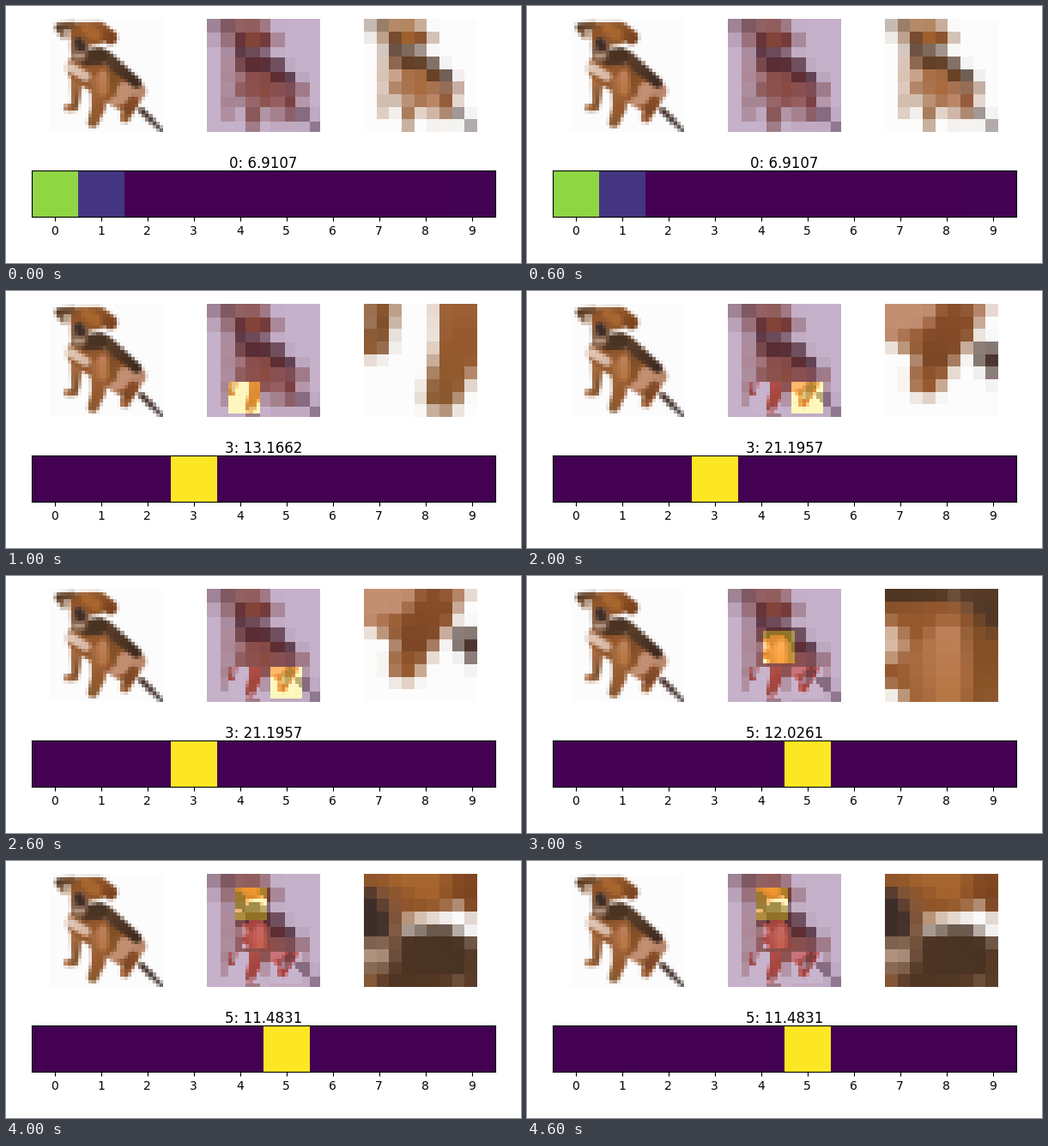
These frames come from a looping animation (600 by 300 pixels, 5 s). A matplotlib script:

```python
import numpy as np
import matplotlib.pyplot as plt
from matplotlib.animation import FuncAnimation
from matplotlib.colors import to_rgb

W, H = 600, 300
N, G = 32, 9              # picture size and glimpse size, in cells
SIDE = 131.9              # picture size on the stage

plt.rcParams["font.family"] = "DejaVu Sans"

# Strokes go on a fine canvas that averages down to 32x32 and 9x9.
S = N * G
gx, gy = np.meshgrid(*[(np.arange(S) + 0.5) / G] * 2)
canvas = np.full((S, S, 3), 0.99)


def stroke(c0, c1, start, end, r0, r1, soft=0.7):
    """Blend in a tapered soft stroke, fading from colour c0 to c1."""
    (x0, y0), (x1, y1) = start, end
    dx, dy = x1 - x0, y1 - y0
    t = np.clip(((gx - x0) * dx + (gy - y0) * dy) / (dx * dx + dy * dy), 0, 1)
    gap = r0 + (r1 - r0) * t - np.hypot(gx - x0 - t * dx, gy - y0 - t * dy)
    cover = np.clip(gap / soft + 0.5, 0, 1)[..., None]
    t = t[..., None]
    tone = np.array(to_rgb(c0)) * (1 - t) + np.array(to_rgb(c1)) * t
    canvas[:] = canvas * (1 - cover) + tone * cover


def draw_dog():
    brown, dark, tan, pink = "#96592e", "#493323", "#a86c42", "#c49074"
    # tail and legs
    stroke("#4a342c", "#5a5052", (26, 26), (31.5, 31.5), 0.9, 0.6)
    stroke(tan, "#80502a", (7.5, 18), (7.3, 23.5), 1.7, 1.1)
    stroke("#80502a", tan, (7, 25), (5.2, 25.2), 1.1, 1.1)
    stroke(brown, brown, (23, 24), (21.3, 28), 2, 1.3)
    # body
    stroke(brown, brown, (9, 14), (21.3, 21.3), 4.2, 4.7)
    stroke(tan, brown, (14, 18), (13.8, 25), 2.4, 1.9)
    stroke(brown, "#8a5a30", (13.5, 26), (12.2, 29.3), 1.8, 1.4)
    stroke("#bd8058", "#b87845", (15, 16), (15, 20), 1.5, 1.5)
    stroke("#7f4e28", "#8a5428", (18, 15), (18.5, 20), 1.5, 1.5)
    stroke(pink, "#b8866a", (21.5, 20.5), (25, 20.5), 2.5, 2.3)
    stroke(pink, pink, (18.5, 23.3), (20.5, 22.5), 1.5, 1.5)
    stroke("#874c28", "#7d4727", (23.5, 23.5), (22, 26), 1.7, 1.4)
    stroke("#5c3f2a", "#402b20", (16, 10.8), (24.5, 18.2), 1.8, 1.5)
    # head
    stroke("#4e3524", dark, (10.5, 11), (14, 10.5), 2.2, 2.4)
    stroke("#925528", "#925528", (9, 4.5), (13.5, 4), 3.5, 3.1)
    stroke("#85583a", "#7a5a44", (8.5, 7.5), (8.3, 10.2), 2.7, 2.3)
    stroke("#8f5428", "#7b431e", (14.5, 2.8), (17.2, 5.3), 1.6, 2)
    stroke("#7a5230", "#5a3a24", (6.5, 2), (2.8, 2.4), 1.2, 1.2)
    stroke("#5a3a24", "#9a7858", (2.6, 2.8), (4, 4.8), 0.9, 0.8)
    stroke("#a8672f", "#a8672f", (10.5, 3), (13, 4.5), 1.5, 1.5)
    stroke("#3d2e2a", "#3d2e2a", (8.2, 6.5), (8.8, 8), 1.2, 1.3)
    # pale muzzle and chest
    stroke("#b0937f", "#b0937f", (7.3, 10.6), (9.2, 10.4), 0.8, 0.8)
    stroke("#e0c6b5", "#d8b8a4", (6, 13.8), (10.2, 16.3), 1.4, 1.4)


def shrink(n):
    b = S // n
    return canvas.reshape(n, b, n, b, 3).mean(axis=(1, 3))


draw_dog()
photo, coarse = shrink(N), shrink(G)
cell = np.arange(N) * G // N
backdrop = coarse[cell][:, cell]
# Sharp cells show warmer and brighter; dark ones keep the coarse tone.
warm = np.clip(photo * [1.4, 1.15, 1.2], 0, 1)
sharp = np.where(photo[..., :1] > 0.55, warm, backdrop)

# (row, column) of each glimpse; the first step sees the coarse picture
spots = [None, (22, 6), (22, 18), (12, 10), (4, 8)]
titles = ["0: 6.9107", "3: 13.1662", "3: 21.1957", "5: 12.0261", "5: 11.4831"]


def window(spot):
    return tuple(slice(a, a + G) for a in spot)


def scores(step):
    p = np.zeros((1, 10))
    if step:
        p[0, int(titles[step][0])] = 1
    else:
        p[0, [0, 1, 9]] = 0.835, 0.16, 0.005
    return p


fig = plt.figure(figsize=(W / 100, H / 100), dpi=100, facecolor="white")


def axes(x, y, w, h):
    return fig.add_axes([x / W, y / H, w / W, h / H])


def show(ax, data, **kw):
    return ax.imshow(data, aspect="auto", interpolation="nearest", **kw)


def picture(x, data):
    ax = axes(x, 153.05, SIDE, SIDE)
    ax.axis("off")
    return ax, show(ax, data)


heat = dict(cmap="viridis", vmin=0, vmax=1)
picture(51.05, photo)
mid_ax, seen = picture(234.05, backdrop)
focus = show(mid_ax, np.zeros((N, N)), alpha=0.3, **heat)
_, glimpse = picture(417.05, coarse)

bar_ax = axes(29.7, 54, 540, 53.9)
bar = show(bar_ax, scores(0), **heat)
bar_ax.set_xticks(range(10))
bar_ax.set_yticks([])
title = fig.text(299.7 / W, 111 / H, titles[0], fontsize=12,
                 ha="center", va="baseline")


def update(step):
    view, mask = backdrop.copy(), np.zeros((N, N))
    for spot in spots[1:step + 1]:
        win = window(spot)
        view[win] = sharp[win]
    if step:
        mask[win] = 1
    glimpse.set_data(photo[win] if step else coarse)
    seen.set_data(view)
    focus.set_data(mask)
    bar.set_data(scores(step))
    title.set_text(titles[step])
    return seen, focus, glimpse, bar, title


anim = FuncAnimation(fig, update, frames=len(spots), interval=1000, repeat=True)
plt.show()
```
